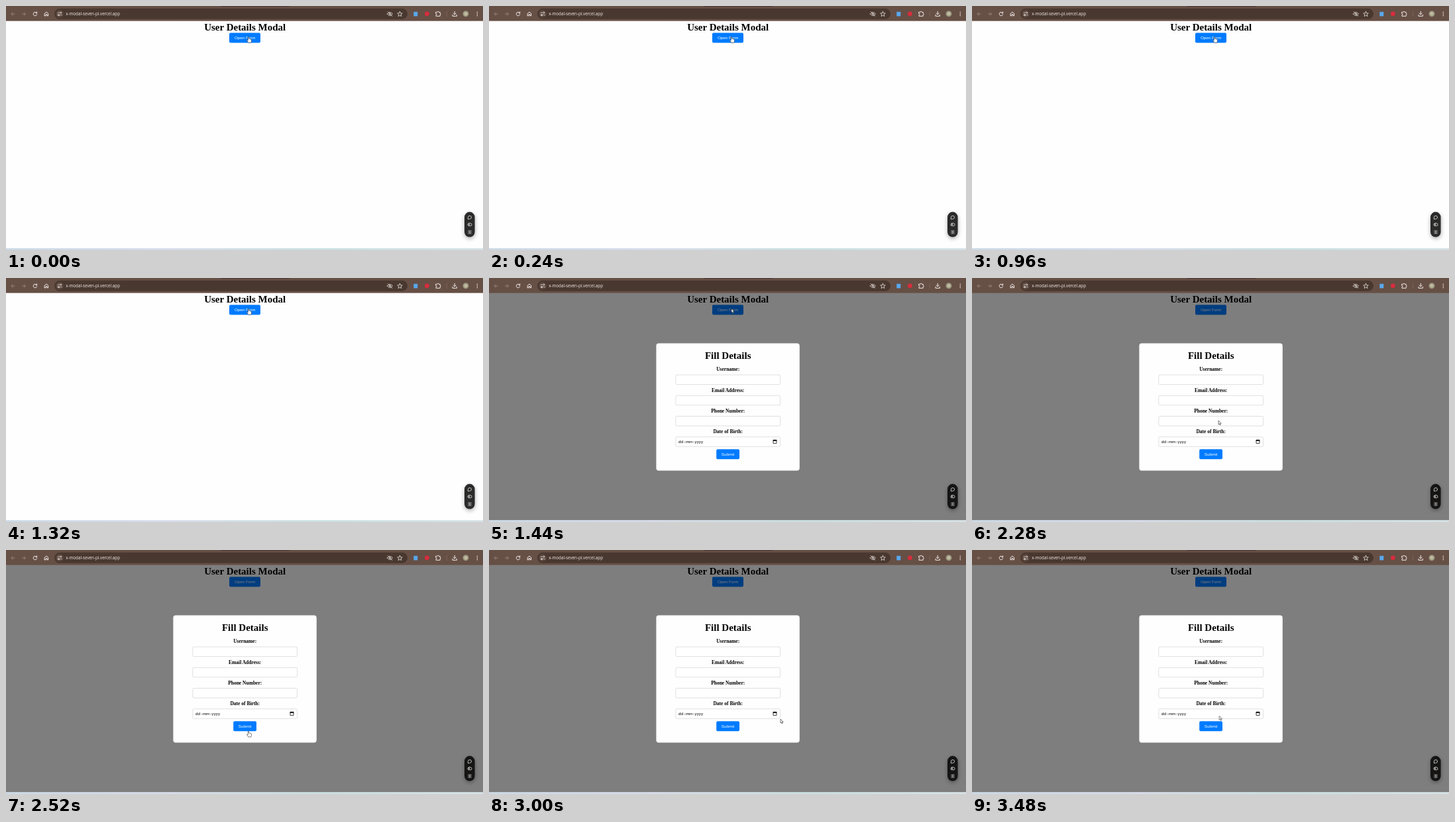
An HTML page that plays this animation: 720x368 px, repeating every 3600 ms.

```html
<!DOCTYPE html>
<html lang="en">
<head>
<meta charset="utf-8">
<title>User Details Modal</title>
<style>
  html, body { margin: 0; width: 100%; height: 100%; overflow: hidden; background: #fefefe; }
  svg { display: block; width: 720px; height: 368px; }
  text { white-space: pre; }
  .serif { font-family: "Liberation Serif", "Times New Roman", serif; font-weight: bold; text-anchor: middle; }
  .h1 { font-size: 15px; }
  .label { font-size: 7.5px; }
  .sans { font-family: "Liberation Sans", Arial, sans-serif; font-size: 6.25px; }
  .btn-text { fill: #fff; text-anchor: middle; }
  .url { font: 6.27px "Open Sans", "Noto Sans", sans-serif; fill: #f4efec; }
  .blue { fill: #007bff; }
  .field { fill: #fff; stroke: #ccc; stroke-width: .6; }
  .line { fill: none; stroke: #f2ece9; stroke-width: 1; stroke-linecap: round; stroke-linejoin: round; }
  .dim { stroke: #93827a; }
  .thin { stroke-width: .75; }

  .modal, .cursor, .hand, .arrow { animation: 3600ms step-end infinite; }
  .modal { animation-name: open; }
  .cursor { animation-name: move; }
  .hand { animation-name: hand; }
  .arrow { animation-name: arrow; }

  @keyframes open { 0% { visibility: hidden } 40%, 100% { visibility: visible } }
  @keyframes hand {
    0% { visibility: visible } 40% { visibility: hidden }
    66.66% { visibility: visible } 76.66%, 100% { visibility: hidden }
  }
  @keyframes arrow {
    0% { visibility: hidden } 40% { visibility: visible }
    66.66% { visibility: hidden } 76.66%, 100% { visibility: visible }
  }
  @keyframes move {
    0% { transform: translate(366px, 46.3px) }
    53.33% { transform: translate(370.2px, 59.3px) }
    56.66% { transform: translate(371px, 95px) }
    60% { transform: translate(372px, 150px) }
    63.33% { transform: translate(372px, 215px) }
    66.66% { transform: translate(371px, 270px) }
    70% { transform: translate(366px, 273px) }
    76.66% { transform: translate(380px, 268px) }
    80% { transform: translate(410px, 262px) }
    83.33% { transform: translate(440px, 255px) }
    86.66% { transform: translate(465px, 247px) }
    90% { transform: translate(479px, 240px) }
    93.33% { transform: translate(430px, 246px) }
    96.66%, 100% { transform: translate(373.3px, 250.3px) }
  }
</style>
</head>
<body>
<svg viewBox="0 0 720 368">
  <defs>
    <linearGradient id="strip">
      <stop offset="0" stop-color="#cbd9e5"/>
      <stop offset=".35" stop-color="#d6dce9"/>
      <stop offset=".65" stop-color="#c9e0e2"/>
      <stop offset="1" stop-color="#d5e2e6"/>
    </linearGradient>
    <radialGradient id="avatar">
      <stop offset="0" stop-color="#d8cfae"/>
      <stop offset="1" stop-color="#8d8b79"/>
    </radialGradient>
    <filter id="soft" x="-100%" y="-50%" width="300%" height="200%">
      <feGaussianBlur stdDeviation="3"/>
    </filter>
  </defs>

  <!-- page -->
  <rect width="720" height="368" fill="#fefefe"/>
  <text class="serif h1" x="360.7" y="36.7">User Details Modal</text>
  <rect class="blue" x="337" y="40.4" width="47" height="15" rx="2"/>
  <text class="sans btn-text" x="360.7" y="50.2">Open Form</text>
  <rect x="692" y="313" width="16" height="38" rx="8" opacity=".3" filter="url(#soft)"/>
  <rect x="692" y="310.6" width="15.6" height="38" rx="7.8" fill="#2b2b2b"/>

  <!-- dialog -->
  <g class="modal">
    <rect y="22" width="720" height="343.5" opacity=".5"/>
    <rect x="252.4" y="98.6" width="216.4" height="192" rx="4" fill="#fefefe"/>
    <text class="serif h1" x="360.7" y="122.2">Fill Details</text>
    <g id="fields"></g>
    <g class="sans">
      <text x="286" y="249.2">dd</text>
      <text x="294.2" y="249.2">-</text>
      <text x="296.9" y="249.2">mm</text>
      <text x="307.9" y="249.2">-</text>
      <text x="310.5" y="249.2">yyyy</text>
    </g>
    <path d="M429 245h5v4.4h-5z" fill="none" stroke="#111" stroke-width=".8"/>
    <path d="M428.6 244.3h5.8v1.5h-5.8zM429.7 243.6h.9v1h-.9zM432.5 243.6h.9v1h-.9z"/>
    <rect class="blue" x="343.2" y="258.2" width="34.8" height="15" rx="2"/>
    <text class="sans btn-text" x="360.6" y="267.9">Submit</text>
  </g>

  <!-- floating toolbar -->
  <g class="line thin">
    <path d="M697.4 321.2v-2.4a2.6 2.4 0 1 1 2.6 2.4z"/>
    <rect x="697" y="327.7" width="6" height="4" rx="2"/>
    <circle cx="699" cy="329.7" r=".7"/>
    <path d="M697.6 339h4.8M697.6 341h4.8M697.6 343h4.8M700 339v4" opacity=".75"/>
  </g>

  <!-- browser bar -->
  <rect width="720" height="22.6" fill="#664f45"/>
  <rect x="325" width="103" height="1" fill="#493730"/>
  <rect x="73" y="3.8" width="533" height="16" rx="8" fill="#49382f"/>
  <circle cx="81" cy="11.8" r="5.8" fill="#5b483f"/>
  <text class="url" x="90.2" y="14">x-modal-seven-pi.vercel.app</text>
  <g class="line">
    <path class="dim" d="M13 12H8m2.3-2.4L8 12l2.3 2.4M24.5 12h5m-2.3-2.4 2.3 2.4-2.3 2.4"/>
    <path d="M46.3 10.4a2.8 2.8 0 1 0 .4 2.3M46.7 8.9v1.9h-1.9"/>
    <path d="M58.4 11.2 61 9l2.6 2.2v3.6h-1.7v-2.2h-1.8v2.2h-1.7z"/>
    <path class="thin" d="M78.2 10.2h2.3M83 13.6h1.3M81.7 13.6h-3.5"/>
    <g class="thin">
      <circle cx="82.6" cy="10.2" r="1.1"/>
      <circle cx="79.5" cy="13.6" r="1.1"/>
      <path d="M575.5 12q4-5.4 8 0-4 5.4-8 0zM576.3 8.6l6.5 6.7"/>
      <circle cx="579.5" cy="12" r="1.2"/>
      <path d="m594.5 8.3 1.1 2.5 2.7.2-2.1 1.8.7 2.7-2.4-1.4-2.4 1.4.7-2.7-2.1-1.8 2.7-.2z"/>
    </g>
    <path d="M649 9.3h2a1.1 1.1 0 0 1 2.2 0h2v2a1.1 1.1 0 0 1 0 2.2v1.8H649v-1.8a1.1 1.1 0 0 0 0-2.2z"/>
    <path d="M677.2 8.2v4.6m-2-1.9 2 2 2-2M674 13.3v2h6.4v-2"/>
    <path d="M665.3 8.5v7" stroke="#88756c" stroke-width=".6"/>
  </g>
  <rect x="615.3" y="8.8" width="6" height="6.6" fill="#58a8ee"/>
  <circle cx="635.4" cy="11.8" r="3.4" fill="#d82d3e"/>
  <circle cx="694" cy="11.7" r="4.5" fill="url(#avatar)"/>
  <g fill="#f2ece9">
    <circle cx="711.3" cy="9.2" r=".8"/>
    <circle cx="711.3" cy="11.9" r=".8"/>
    <circle cx="711.3" cy="14.6" r=".8"/>
  </g>

  <rect y="365.3" width="720" height="2.7" fill="url(#strip)"/>

  <!-- pointer, hotspot at 0,0 -->
  <g class="cursor" fill="#fff" stroke="#222" stroke-width=".6" stroke-linejoin="round">
    <path class="hand" d="M-.7.5Q0-.3.7.5V3q1.2-.3 1.4.5 1.2-.3 1.3.5 1.2-.1 1.2.8V6.2Q4.4 7.7 3.6 9H-.1Q-1.2 7.2-2.6 5.7-2.4 4.5-.7 5.5z"/>
    <path class="arrow" d="M0 0V6L1.4 4.8 2.3 6.9 3.3 6.4 2.4 4.4H4.2z"/>
  </g>
</svg>
<script>
  const labels = ["Username:", "Email Address:", "Phone Number:", "Date of Birth:"];
  document.getElementById("fields").innerHTML = labels.map((label, i) => {
    const y = 31.2 * i;
    return `<text class="serif label" x="360.7" y="${140.3 + y}">${label}</text>
      <rect class="field" x="281.8" y="${146.1 + y}" width="157.8" height="14.5" rx="2"/>`;
  }).join("");
</script>
</body>
</html>
```
